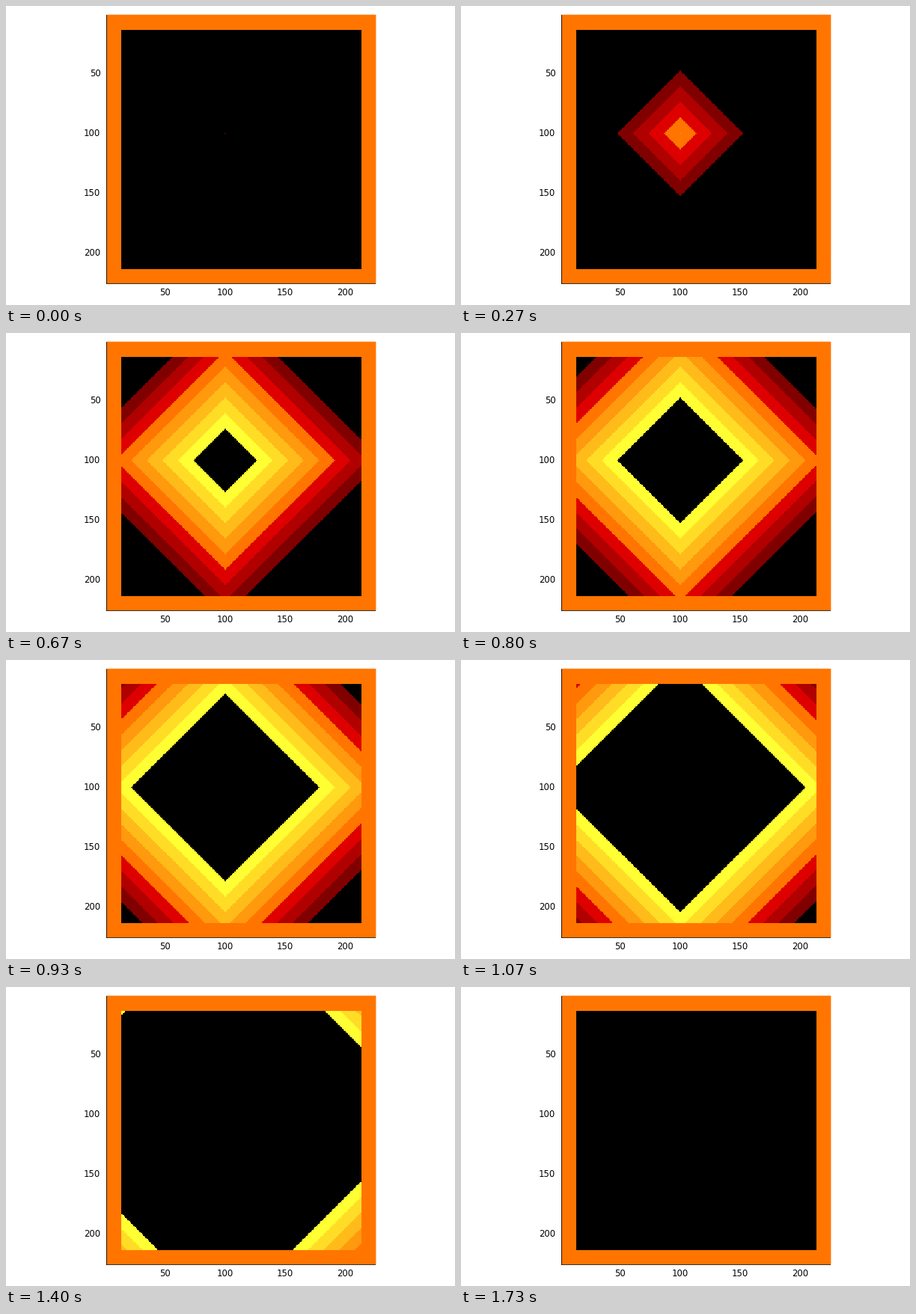
A matplotlib script for the animation above (1.79 s loop, 600x400 px).

```python
import numpy as np
import matplotlib.pyplot as plt
from matplotlib.animation import FuncAnimation
from matplotlib.colors import to_rgb
from matplotlib.patches import Rectangle

W, H, DPI = 600, 400, 100
LEFT, RIGHT, TOP, BOTTOM = 134, 494, 12, 371   # heatmap box in pixels
X0, DX = 133.1, 1.602                          # grid origin and cell size
Y0, DY = 10.75, 1.599
FIRST, LAST, SEED = 14, 213, 100               # open cells and start cell
SPEED, LEVELS = 13, 8                          # cells per step, burning levels
TICKS = (50, 100, 150, 200)
ORANGE = "#ff7500"

shades = ["#000000", "#800000", "#b00000", "#de0000", ORANGE,
          "#ff990d", "#ffbb1a", "#ffdd26", "#ffff33"]
palette = np.array([to_rgb(s) for s in shades])


def cells(pixels, origin, size):
    """Grid cell (counted from 1) under each pixel."""
    return np.floor((pixels - origin) / size).astype(int) + 1


def is_rim(c):
    return (c < FIRST) | (c > LAST)


col = cells(np.arange(LEFT, RIGHT), X0, DX)
row = cells(np.arange(TOP, BOTTOM), Y0, DY)[:, None]
dist = abs(col - SEED) + abs(row - SEED)
rim = is_rim(col) | is_rim(row)


def heat(step):
    """Colours of the spreading diamond after a number of steps."""
    level = (SPEED * step - dist) // SPEED + 1
    level[(level < 0) | (level > LEVELS)] = 0
    level[rim] = shades.index(ORANGE)
    return palette[level]


fig = plt.figure(figsize=(W / DPI, H / DPI), dpi=DPI, facecolor="white")

# soft outer edge of the heatmap, below the picture
fig.add_artist(Rectangle((LEFT / W, 1 - 371.5 / H), 360.4 / W, 359.9 / H,
                         color=ORANGE, lw=0, snap=False, zorder=-1))
picture = fig.figimage(heat(0), xo=LEFT, yo=H - BOTTOM, origin="upper")

ax = fig.add_axes([0, 0, 1, 1], zorder=1)
ax.set(xlim=(0, W), ylim=(H, 0))
ax.axis("off")

line = dict(color="black", lw=72 / DPI, solid_capstyle="butt", snap=False)
ax.plot([134.5, 134.5], [TOP, BOTTOM + 1], alpha=0.85, **line)
ax.plot([LEFT, RIGHT], [371.5, 371.5], alpha=0.75, **line)

font = dict(family="DejaVu Sans", size=8.4, color="black", va="baseline")
for tick in TICKS:
    x, y = X0 + DX * (tick - 0.5), Y0 + DY * (tick - 0.5)
    ax.text(x + 0.3, 387, str(tick), ha="center", **font)
    ax.text(126.4, round(y + 4.2), str(tick), ha="right", **font)


def update(i):
    # 10 ms ticks, 15 steps per second
    step = int((i + 0.5) * 15 / 100)
    picture.set_data(heat(step))
    return (picture,)


anim = FuncAnimation(fig, update, frames=179, interval=10, repeat=True, repeat_delay=0)
plt.show()
```
